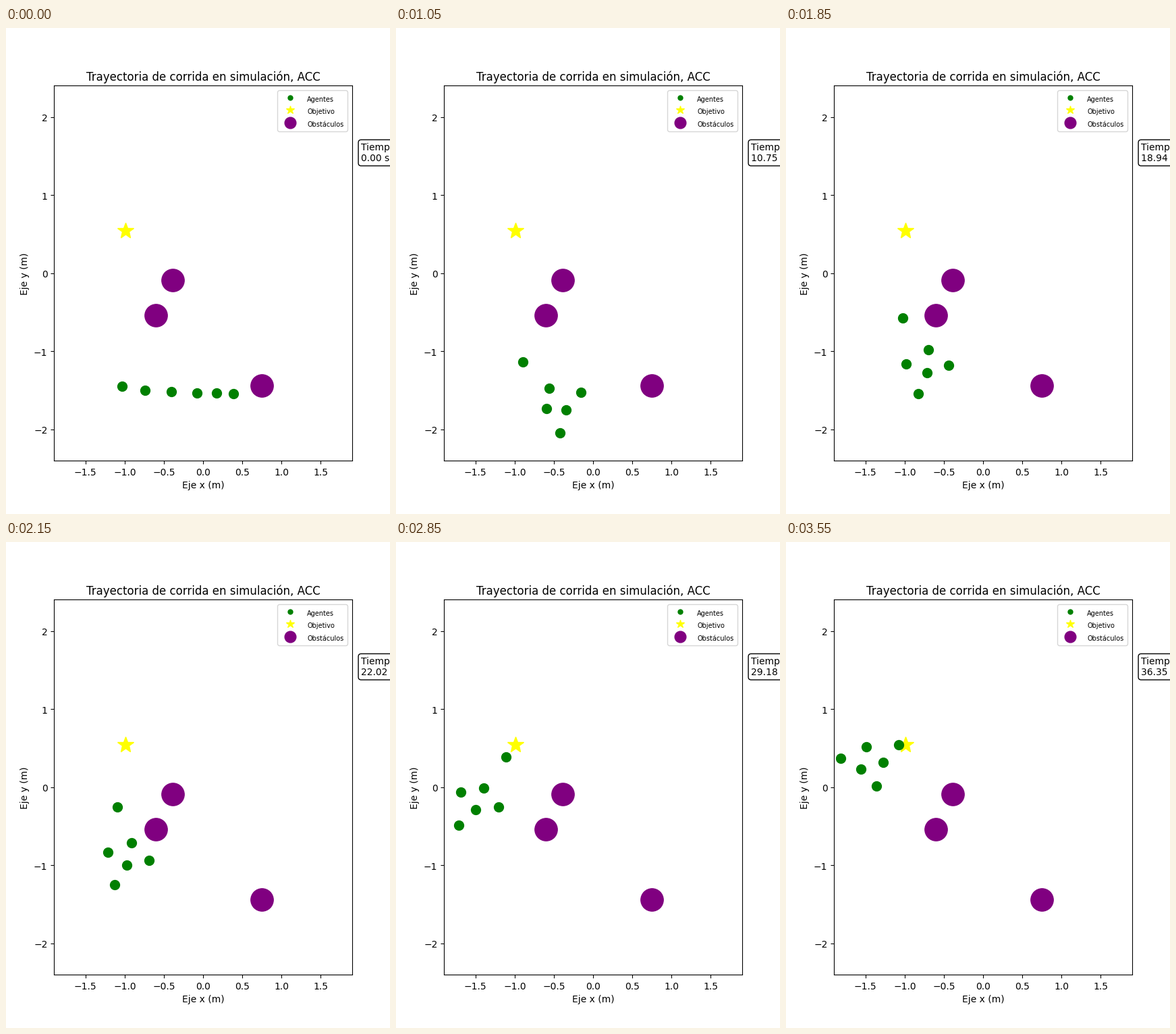
Recreate the animation shown at these times as a matplotlib script. Size 569x719 px, loop 3.6 s.

```python
import numpy as np
import matplotlib.pyplot as plt
from matplotlib.animation import FuncAnimation
from matplotlib.transforms import ScaledTranslation

W, H, DPI = 569, 719, 100
FRAMES, INTERVAL = 72, 50
DT = 0.512          # simulated seconds per frame
GATHER = 13         # frames until the row has become a flock

# Axes box in pixels, measured from the bottom left
LEFT, BOTTOM, WIDTH, HEIGHT = 71.25, 79.2, 441.74, 554.4
XMAX, YMAX = 1.9, 2.4

# Key points in stage pixels: time, x, y
LEADER = [(13, 193, 551), (18, 185, 515), (22, 190, 488), (28, 219, 462),
          (37, 173, 429), (49, 162, 354), (57, 163, 318), (71, 167, 300)]
HEART = [(13, 264, 560), (20, 254, 565), (28, 238, 548), (37, 209, 510),
         (49, 148, 444), (57, 118, 396), (64, 105, 362), (71, 111, 336)]

# Agents circling the heart: first radius, then angles at the turn times
RADIUS = 34
TURNS = (13, 28, 57, 71)
RING = {
    1: (47, 188, 258, 291, 284),
    2: (25, 175, 189, 230, 209),
    4: (33, 275, 331, 353, 343),
    5: (37, 107, 105, 137, 47),
}
ROW = (172, 206, 245, 283, 312, 337)    # x of the agents at the start


def to_data(px, py):
    """Stage pixels (y down) to axis units."""
    x = ((px - LEFT) / WIDTH * 2 - 1) * XMAX
    y = ((H - py - BOTTOM) / HEIGHT * 2 - 1) * YMAX
    return x, y


def smooth(t, ts, vs):
    """Monotone cubic interpolation."""
    ts, vs = np.array(ts, float), np.array(vs, float)
    step = np.diff(ts)
    slope = np.diff(vs) / step
    a, b = slope[:-1], slope[1:]
    same = a * b > 0
    inner = np.where(same, 2 * a * b / np.where(same, a + b, 1), 0)
    tangent = np.concatenate([slope[:1], inner, slope[-1:]])
    i = np.clip(np.searchsorted(ts, t, side="right") - 1, 0, len(step) - 1)
    h = step[i]
    u = (t - ts[i]) / h
    return ((1 + 2 * u) * (1 - u) ** 2 * vs[i] + u * (1 - u) ** 2 * h * tangent[i]
            + u * u * (3 - 2 * u) * vs[i + 1] + u * u * (u - 1) * h * tangent[i + 1])


def along(keys, t):
    ts, xs, ys = zip(*keys)
    return np.array([smooth(t, ts, xs), smooth(t, ts, ys)])


def flock(agent, t):
    """Place of an agent once the flock has formed."""
    if agent == 0:
        return along(LEADER, t)
    heart = along(HEART, t)
    if agent not in RING:
        return heart
    first, *angles = RING[agent]
    r = np.interp(t, TURNS[:2], (first, RADIUS))
    angle = np.radians(smooth(t, TURNS, angles))
    return heart + r * np.array([np.cos(angle), np.sin(angle)])


def track(agent):
    """Agent position in axis units for every frame."""
    n = np.arange(FRAMES, dtype=float)
    start = np.array([[ROW[agent]], [541 - 11 * 0.5 ** agent]])
    u = np.minimum(n / GATHER, 1)
    ease = (1 - np.exp(-2.6 * u)) / (1 - np.exp(-2.6))
    goal = flock(agent, np.maximum(n, GATHER))
    return to_data(*np.round(start + (goal - start) * ease))


tracks = np.array([track(k) for k in range(len(ROW))])

# The tiny margin guards against truncation of the pixel size
fig = plt.figure(figsize=((W + 0.001) / DPI, (H + 0.001) / DPI), dpi=DPI)
ax = fig.add_axes([LEFT / W, BOTTOM / H, WIDTH / W, HEIGHT / H])
ax.set_xlim(-XMAX, XMAX)
ax.set_ylim(-YMAX, YMAX)
ax.set_title("Trayectoria de corrida en simulación, ACC")
ax.set_xlabel("Eje x (m)")
ax.set_ylabel("Eje y (m)")

agents, = ax.plot([], [], "o", color="green", ms=10, zorder=3, label="Agentes")
ax.plot(*to_data(177, 300), "*", color="yellow", ms=18, label="Objetivo")
ax.plot(*to_data(np.array([247, 222, 379]), np.array([373, 425, 529])), "o",
        color="purple", ms=24, label="Obstáculos")

legend = ax.legend(loc="upper right", markerscale=0.5)
plt.setp(legend.get_texts(), fontsize=7)

clock = ax.text(1.03, 0.85, "", transform=ax.transAxes, va="top",
                bbox=dict(boxstyle="round", facecolor="white"))

# Text sits one pixel lower; the x label follows its tick labels
drop = ScaledTranslation(0, -1 / DPI, fig.dpi_scale_trans)
for text in [ax.title, ax.yaxis.label, clock, *ax.get_xticklabels(),
             *ax.get_yticklabels(), *legend.get_texts()]:
    text.set_transform(text.get_transform() + drop)


def update(n):
    agents.set_data(tracks[:, 0, n], tracks[:, 1, n])
    clock.set_text(f"Tiempo:\n{n * DT:.2f} s")
    return agents, clock


anim = FuncAnimation(fig, update, frames=FRAMES, interval=INTERVAL,
                     init_func=lambda: update(0), repeat=True, repeat_delay=0)
plt.show()
```
